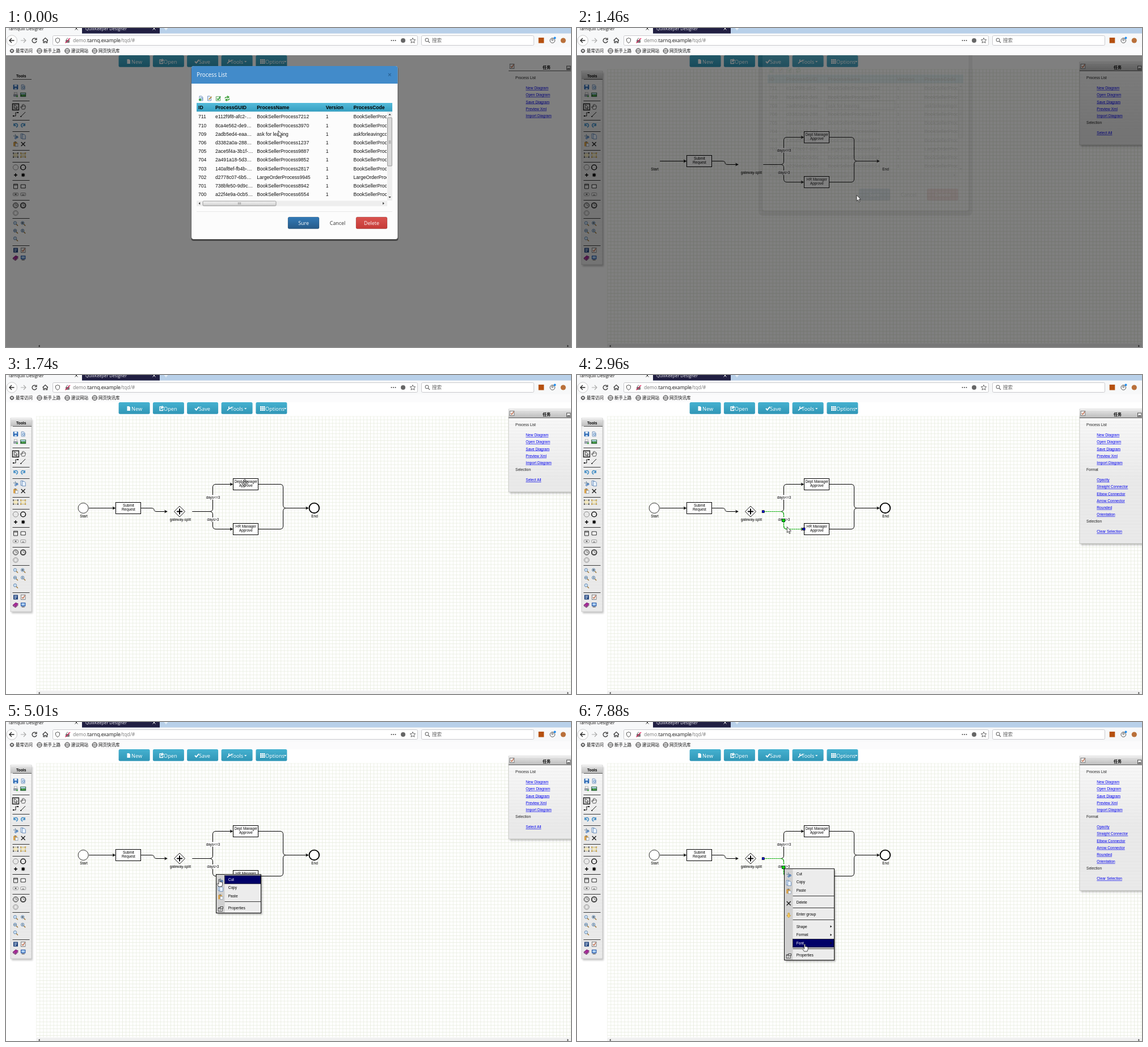
Recreate the animation shown at these times as an HTML page. Size 996 by 562 pixels, loop 8000 ms.

```html
<!DOCTYPE html>
<html lang="en">
<head>
<meta charset="utf-8">
<title>Process designer</title>
<style>
html,body{margin:0;width:100%;height:100%;overflow:hidden;background:#fff}
svg{display:block;width:996px;height:562px}
text{font-family:"Liberation Sans",Arial,sans-serif;white-space:pre}
.ui{font-family:"Open Sans","Noto Sans CJK SC","Noto Sans CJK",sans-serif}
</style>
</head>
<body>
<svg id="stage" viewBox="0 0 996 562" xmlns="http://www.w3.org/2000/svg"></svg>
<script>
const R = (x, y, w, h, fill, extra = '') => `<rect x="${x}" y="${y}" width="${w}" height="${h}" fill="${fill}" ${extra}/>`;
const P = (d, stroke = '#000', w = 1, fill = 'none', extra = '') => `<path d="${d}" stroke="${stroke}" stroke-width="${w}" fill="${fill}" ${extra}/>`;
const C = (x, y, r, stroke = '#000', w = 1, fill = 'none') => `<circle cx="${x}" cy="${y}" r="${r}" stroke="${stroke}" stroke-width="${w}" fill="${fill}"/>`;
// y is the middle of the capitals
const T = (x, y, s, size, extra = '') => `<text x="${x}" y="${y + size * .36}" font-size="${size}" ${extra}>${s.replace(/</g, '&lt;')}</text>`;
const G = (id, body, extra = '') => `<g id="${id}" ${extra}>${body}</g>`;
const at = (x, y, body) => `<g transform="translate(${x} ${y})">${body}</g>`;
const UI = 'class="ui"', MID = 'text-anchor="middle"', BOLD = 'font-weight="bold"';
const LINK = 'fill="#00e" text-decoration="underline"';

// ---- small icons, centred on 0,0
const doc = P('M-3 -4H1L3 -2V4H-3Z', '#5a7fae', .8, '#e6f0fc');
const lens = c => P('M1 1L4 4', '#a07a3c', 1.5) + C(-1, -1, 2.7, '#5c7fa8', .9, '#cfe4f5') + (c ? P(c, '#222', .8) : '');
const clock = w => C(0, 0, 4.5, '#222', w, '#fff') + C(0, 0, 2.9, '#555', .6) + P('M0 -2V0H2', '#222', .7);
const nodes = c => P('M-4 -3.5H4V3.5H-4Z', '#777', .8, '#f1e7c0', 'stroke-dasharray="1.6 1"') + R(-5, -4.5, 2, 2, c) + R(3, -4.5, 2, 2, c) + R(-5, 2.5, 2, 2, c) + R(3, 2.5, 2, 2, c);
const icon = {
  save: R(-4.3, -4.3, 8.6, 8.6, '#2563b0', 'rx="1"') + R(-2.4, -4, 4.8, 3.4, '#dcebfb') + R(-2, 1.4, 4, 2.9, '#b9d3ef'),
  preview: doc + C(.6, .5, 1.8, '#3b6ea5', .8, '#d7ebfa'),
  print: R(-4, -1, 8, 4.4, '#9aa2ad', 'rx="1"') + R(-2.4, -4, 4.8, 3.4, '#f4f4f4', 'stroke="#888" stroke-width=".5"') + R(1, 1.6, 3, 2.4, '#4aa84a'),
  image: R(-5, -3.7, 10, 7.4, '#2c5f39') + R(-4, -2.8, 8, 2.3, '#b8e0ef') + P('M-4 2.5L-1 -.5L1 1L3 0L4 2.5Z', 'none', 0, '#4fae4c'),
  pointer: P('M-5.5 -5.5H5.5V5.5H-5.5Z', '#222', 1.4, '#ddd') + P('M-2 -4V3L0 1.5L1.2 4L2.3 3.4L1.2 1H3Z', '#000', .7, '#fff'),
  pan: P('M-2 4L-4.5 0L-3 -.3L-2 1V-3L-1 -3.6V-4L1 -4.2L2.3 -3.4L4 -2V1L2.7 4Z', '#222', .8, '#fff') + P('M-.7 -3V0M1 -3V0M2.6 -2V0', '#222', .5),
  elbow: P('M-4 3H0V-3H4', '#000', .9) + R(-5, 2, 2, 2, '#000') + R(3, -4, 2, 2, '#000'),
  line: P('M-4 4L4 -4', '#000', .9) + R(-4.8, 3, 1.8, 1.8, '#000'),
  undo: P('M-3 -3V1H1M-3 .7C-1 -4 4 -3 3.4 1Q3 3 1 4', '#3d8bc4', 1.5),
  redo: P('M3 -3V1H-1M3 .7C1 -4 -4 -3 -3.4 1Q-3 3 -1 4', '#3d8bc4', 1.5),
  cut: P('M-4 -1L4 0M-1 -4L2 2', '#5f7f9c', 1) + C(0, 2.8, 1.4, '#2767b8', 1) + C(3, 1.4, 1.2, '#2767b8', 1),
  copy: at(-1.2, -.6, doc) + at(1.3, .6, doc),
  paste: R(-4, -3.8, 6.6, 7.8, '#dca349', 'rx=".8"') + R(-2.2, -4.6, 3, 1.8, '#777') + R(-.6, -1, 4.6, 5.2, '#f5f8ff', 'stroke="#789" stroke-width=".6"'),
  del: P('M-3.5 -3.5L3.5 3.5M3.5 -3.5L-3.5 3.5', '#222', 1.4),
  group: nodes('#444'), ungroup: nodes('#c8951d'),
  thin: C(0, 0, 4.6, '#777', .8), thick: C(0, 0, 4.4, '#000', 1.4),
  plus: P('M-3 0H3M0 -3V3', '#000', 1.5),
  star: C(0, 0, 2.2, '#000', 1, '#000') + P('M-3 -3L3 3M3 -3L-3 3M-3.4 0H3.4M0 -3.4V3.4', '#000', .7),
  pool: P('M-3.5 -4H3.5V4H-3.5ZM-3.5 -2.3H3.5', '#333', 1), box: P('M-4 -3H4V3H-4Z', '#111', .9, '#fff'),
  tag: R(-4.5, -2.5, 9, 5, '#eee', 'rx="1" stroke="#888" stroke-width=".8"') + R(-1.5, -1, 3, 2, '#555'),
  tag2: R(-4.5, -2.5, 9, 5, '#eee', 'rx="1" stroke="#888" stroke-width=".8"') + P('M-2 1H2', '#555', 1),
  clock: clock(1), clock2: clock(1.5), ring: C(0, 0, 4.5, '#888', .8) + C(0, 0, 3, '#999', .6),
  zoom: lens(), zoomIn: lens('M-2.6 -1H.6M-1 -2.6V.6'), zoomOut: lens('M-2.6 -1H.6'), zoomOne: lens('M-1 -2.5V.5'), zoomFit: lens(),
  chart: R(-4, -4, 8, 8, '#1d3f78') + P('M-2.5 -2H2.5M-2.5 0H2M-2.5 2H1', '#cfe0f5', 1),
  task: R(-3.8, -4, 7.6, 8, '#f3f3f3', 'stroke="#666" stroke-width=".8"') + P('M-2 0L-.4 2L3 -3', '#b5522c', 1.2),
  book: P('M-4.5 0L0 -4L4.5 -2L0 3.5Z', '#5d0d57', .6, '#a62a98') + P('M-4.5 0V2L0 4.6L4.5 0', '#5d0d57', 1),
  screen: R(-4.2, -4, 8.4, 6.4, '#2859a8') + R(-3, -3, 6, 4, '#a9cdf2') + R(-2.5, 3, 5, 1.2, '#555'),
  down: P('M-1.3 -4H1.3V0H3.5L0 4L-3.5 0H-1.3Z', '#c08a1e', .7, '#fbd063'),
  prop: R(-4, -2.2, 7, 6, '#fff', 'stroke="#222" stroke-width=".8"') + P('M-4 -1.4H3', '#222', 1) + R(-.4, -4, 4.6, 3.4, '#ddd', 'stroke="#222" stroke-width=".8"') + P('M-2.5 1H1.5M-2.5 2.4H1', '#444', .6),
};

// ---- page
const button = (x, label, tx, pic, caret) => R(x, 48, 55, 20.8, 'url(#btn)', 'rx="2.5"') +
  pic + T(tx, 59.2, label, 9.2, `${UI} fill="#fff"`) + (caret ? P(`M${caret} 58.2h4.4l-2.2 2.4Z`, 'none', 0, '#fff') : '');
const buttons = button(198.6, 'New', 221, P('M213.5 55H217L219 57V63H213.5Z', 'none', 0, '#fff')) +
  button(258.9, 'Open', 278, P('M275 56H271V62.5H276.5V60M273.3 60Q273.5 56.8 276 56.8M275 54.6L277.6 56.8L275 59', '#fff', 1.3)) +
  button(319.1, 'Save', 340, P('M333 59L335.5 61.5L340 56', '#fff', 1.9)) +
  button(379.6, 'Tools', 396, P('M390 62.5L394 58.5M393.4 55.5Q392 58.5 394 58.8Q396 59.5 397 57', '#fff', 1.7), 420) +
  button(440.4, 'Options', 457, R(448, 55, 8.4, 8, '#fff') + P('M448 57.6h8.4M448 60.4h8.4M450.7 55v8M453.6 55v8', '#37a0c0', .6), 490);

const toolRows = [[104, 'save', 'preview'], [117.5, 'print', 'image'], [139, 'pointer', 'pan'], [152, 'elbow', 'line'], [171, 'undo', 'redo'],
  [191, 'cut', 'copy'], [204.5, 'paste', 'del'], [224, 'group', 'ungroup'], [245.5, 'thin', 'thick'], [259, 'plus', 'star'],
  [279, 'pool', 'box'], [293, 'tag', 'tag2'], [312.5, 'clock', 'clock2'], [326, 'ring'], [344.5, 'zoom', 'zoomIn'],
  [358, 'zoomOut', 'zoomOne'], [371.5, 'zoomFit'], [391.5, 'chart', 'task'], [405, 'book', 'screen']];
const frame = (id, x, y, w, h) => R(x + 2, y + 3, w, h, '#000', `opacity=".22" filter="url(#soft)" class="${id}"`) +
  R(x, y, w, h, 'url(#face)', `class="${id}"`) + R(x, y, w, h, 'url(#stripe)', `class="${id}" stroke="#bbb" stroke-width=".6"`);
const tools = G('toolFace', frame('tf', 8, 76, 37, 341) + R(8, 78, 37, 12.5, 'url(#bar)')) + P('M12 90.5H45', '#333', .8) +
  T(26.7, 85, 'Tools', 6.8, `${MID} ${BOLD}`) +
  [128, 162, 182, 215, 236, 268, 303, 335, 383].map(y => P(`M11.5 ${y + .5}H41.5`, '#222', .9)).join('') +
  toolRows.map(([y, a, b]) => at(17, y, icon[a]) + (b ? at(30.2, y, icon[b]) : '')).join('');

const links = (y, names) => names.map((s, i) => T(916.3, y + i * 12.1, s, 6.6, LINK)).join('');
const head = (y, s) => T(898, y, s, 6.6, 'fill="#222"');
const panel = G('panelFace', frame('pf', 886, 60, 116, 146) + R(886, 62, 110, 13, 'url(#bar)')) + P('M886 75.5H996', '#333', .8) +
  at(892, 67.5, icon.task) + T(953, 69.3, '任务', 7, `${UI} ${MID} ${BOLD}`) +
  R(988.5, 67, 6.5, 6.5, '#eee', 'stroke="#333" stroke-width=".8"') + P('M989.5 71.7H994', '#222', 1.2) +
  head(87.5, 'Process List') + links(106, ['New Diagram', 'Open Diagram', 'Save Diagram', 'Preview Xml', 'Import Diagram']) +
  G('plain', head(166.7, 'Selection') + links(185, ['Select All'])) +
  G('format', head(166.7, 'Format') + links(185, ['Opacity', 'Straight Connector', 'Elbow Connector', 'Arrow Connector', 'Rounded', 'Orientation']) +
    head(257.7, 'Selection') + links(276, ['Clear Selection']));

// ---- diagram, lines centred on pixels
const wire = (d, tip) => P(d) + (tip ? P(`M${tip[0]} ${tip[1]}l-5 -2.6l1.2 2.6l-1.2 2.6Z`, '#000', .3, '#000') : '');
const label = (x, y, s) => T(x, y, s, 6.4, MID);
const task = (x, y, a, b) => R(x, y, 44, 20, '#fff', 'stroke="#000"') + label(x + 22.4, y + 5.3, a) + label(x + 22.4, y + 12.6, b);
const lower = 'M328.5 240.5H359Q364.5 240.5 364.5 246V266Q364.5 271.5 370 271.5H399';
const diagram = wire('M146 234.5H192', [193, 234.5]) + wire('M237.5 234.5H256Q261 234.5 261 237.5Q261 240.5 266 240.5H283', [284.5, 240.5]) +
  wire('M328.5 240.5H359Q364.5 240.5 364.5 235V198Q364.5 192.5 370 192.5H399', [400, 192.5]) + wire(lower, [400, 271.5]) +
  wire('M444 192.5H483Q488.5 192.5 488.5 198V229Q488.5 234.5 494 234.5H532', [533.5, 234.5]) +
  wire('M444 271.5H483Q488.5 271.5 488.5 266V240Q488.5 234.5 494 234.5') +
  G('picked', P(lower, '#0a0', 1.2) + P(lower, '#9fe09f', 1.2, 'none', 'stroke-dasharray="1 2.6"')) +
  task(193.5, 224.5, 'Submit', 'Request') + task(400.5, 182.5, 'Dept Manager', 'Approve') + task(400.5, 261.5, 'HR Manager', 'Approve') +
  R(353, 211.5, 24.5, 8, '#fff') + label(365, 215.4, 'days<=3') + R(354.5, 251, 21, 8, '#fff') + label(365, 254.9, 'days>3') +
  label(137, 248.3, 'Start') + label(307.3, 254.5, 'gateway-split') + label(544, 248.3, 'End') +
  G('shapes', C(136.2, 234.5, 9, '#000', .8, '#fff') + C(543.3, 234.4, 8.8, '#000', 1.9, '#fff') +
    P('M306 231L315.5 240.5L306 250L296.5 240.5Z', '#000', .9, '#fff') + P('M301 240.5H311M306 235.5V245.5', '#000', 2)) +
  G('grips', [[328.2, 240.7], [400, 271.3]].map(([x, y]) => R(x - 2, y - 2, 4, 4, '#00d', 'stroke="#000" stroke-width=".7"')).join('') +
    R(361.5, 253.5, 5, 5, '#0e0', 'stroke="#042" stroke-width="1"'));

// ---- context menus
const ROW = 14.6, GAP = 21.2;
function menu(id, x, y, w, items) {
  let cy = y + 9, body = '', rows = [];
  items.forEach(([name, pic, sub, gap], i) => {
    body += G(`${id}-${i}`, R(x + 15, cy - 7.1, w - 15.5, ROW, '#000068', 'stroke="#000" stroke-width=".6"')) +
      T(x + 21.2, cy, name, 6.6, `id="${id}t${i}"`) + (pic ? at(x + 7.7, cy + 1.6, icon[pic]) : '') +
      (sub ? P(`M${x + 81} ${cy - 2}l2.8 2l-2.8 2Z`, 'none', 0, '#111') : '');
    if (gap) body += P(`M${x + 15} ${Math.floor(cy + 10.6) - .5}H${x + w}`, '#222', .9);
    rows.push(cy);
    cy += gap ? GAP : ROW;
  });
  const h = Math.round(rows[rows.length - 1] + 8.4 - y);
  const base = R(x + 2, y + 2.5, w, h, '#000', 'opacity=".35" filter="url(#soft)"') + R(x, y, w, h, '#ececec') + R(x, y, 15, h, '#d0d0d0');
  return { id, x, y, w, h, rows, svg: G(id, base + body + R(x, y, w, h, 'none', 'stroke="#111"')) };
}
const clip = [['Cut', 'cut'], ['Copy', 'copy'], ['Paste', 'paste', 0, 1]];
const small = menu('small', 370.5, 268.5, 79, [...clip, ['Properties', 'prop']]);
const large = menu('large', 365.5, 258.5, 88, [...clip, ['Delete', 'del', 0, 1], ['Enter group', 'down', 0, 1],
  ['Shape', '', 1], ['Format', '', 1], ['Font', '', 1, 1], ['Properties', 'prop']]);

// ---- dialog
const list = [['711', 'e112f9f8-afc2-…', 'BookSellerProcess7212'], ['710', '8ca4e562-de9…', 'BookSellerProcess3970'],
  ['709', '2adb5ed4-eaa…', 'ask for leaving', 'askforleavingcode'], ['706', 'd3382a0a-288…', 'BookSellerProcess1237'],
  ['705', '2ace5f4a-3b1f-…', 'BookSellerProcess9887'], ['704', '2a491a18-5d3…', 'BookSellerProcess9852'],
  ['703', '140af8ef-fb4b-…', 'BookSellerProcess2817'], ['702', 'd2778c07-6b5…', 'LargeOrderProcess9945'],
  ['701', '738bfe50-9d9c…', 'BookSellerProcess8942'], ['700', 'a22f4e9a-0cb5…', 'BookSellerProcess6554']];
const cols = [339, 369, 442.3, 563.7, 612.5];
const cells = (y, vals, extra) => vals.map((s, i) => T(cols[i], y, s, 8.62, extra)).join('');
const tri = d => P(d, 'none', 0, '#333');
const big = (x, fill, s) => R(x, 333, 55, 20.7, fill, 'rx="2.5" stroke="#0003" stroke-width=".8"') + T(x + 27.5, 343.8, s, 8.9, `${UI} ${MID} fill="#fff"`);
const dialog = G('halo', R(320, 60, 377, 321, '#000', 'rx="8"')) + G('dialog',
  R(326.5, 68, 365, 307, '#000', 'rx="4" opacity=".45"') + R(327, 67, 363.5, 305, '#fcfcfc', 'rx="4"') +
  P('M327 98V71Q327 67 331 67H686.5Q690.5 67 690.5 71V98Z', 'none', 0, '#428bca') +
  T(336, 82.8, 'Process List', 9.9, `${UI} fill="#fff"`) + P('M674 80L678.6 84.6M678.6 80L674 84.6', '#2a6496', 1.1) +
  at(344, 124, icon.preview + C(-2, 2.5, 2.3, '#fff', .4, '#2f9e3a')) + at(358.5, 124, doc + P('M-1 2L4 -3', '#b98425', 1.6)) +
  at(374, 124.5, P('M-3.7 -3.7H3.7V3.7H-3.7Z', '#5b9a5d', .9, '#e8f6e8') + P('M-2 0L0 2L4 -4', '#23962f', 1.4)) +
  at(390, 124, P('M-4 0Q-3 -3 2 -2.4M0 -4.4L3 -2.3L.3 -.4M4 .5Q3 3.4 -2 2.8M0 .8L-3 2.7L-.3 4.7', '#3b9e37', 1.4)) +
  R(336, 132, 345, 15.3, 'url(#head)') + cells(140.2, ['ID', 'ProcessGUID', 'ProcessName', 'Version', 'ProcessCode'], BOLD) +
  G('rows', list.map(([id, g, n, code = n], i) => cells(156.3 + i * 15.2, [id, g, n, '1', code], 'fill="#111"')).join(''), 'clip-path="url(#table)"') +
  G('edit', R(439.5, 178.5, 121, 15, 'none', 'stroke="#555" stroke-width=".9"')) +
  R(672, 148, 9, 156, '#eee') + R(672.5, 158, 7.8, 85, '#d9d9d9', 'rx="1" stroke="#888" stroke-width=".8"') +
  P('M674.5 199h4M674.5 201h4M674.5 203h4', '#777', .7) + tri('M674.3 153.5l2.2 -2.6l2.2 2.6Z') + tri('M674.3 297l2.2 2.6l2.2 -2.6Z') +
  R(336, 304.3, 336, 9.5, '#eee') + R(347, 305, 129, 8.2, 'url(#thumb)', 'rx="1.5" stroke="#888" stroke-width=".8"') +
  P('M409.5 307v4M411.5 307v4M413.5 307v4', '#777', .7) + tri('M342.2 306.8l-2.6 2.2l2.6 2.2Z') + tri('M664.2 306.8l2.6 2.2l-2.6 2.2Z') +
  P('M336 323.5H681', '#e5e5e5', .8) + big(497, 'url(#blue)', 'Sure') + T(584.5, 343.8, 'Cancel', 8.9, `${UI} ${MID} fill="#333"`) + big(617, 'url(#red)', 'Delete'));

// ---- browser window
const globe = x => C(x, 40.3, 4.3, '#333', .9) + P(`M${x - 4} 40.3h8M${x} 36v8.6M${x - 2} 37q-2 3.3 0 6.6M${x + 2} 37q2 3.3 0 6.6`, '#333', .6);
const mark = (x, s) => T(x, 40.2, s, 7.5, `${UI} fill="#111"`);
const grey = s => `<tspan fill="#777">${s}</tspan>`;
const cross = (x, c) => P(`M${x - 2.5} -1.5l5 5M${x + 2.5} -1.5l-5 5`, c, 1);
const chrome = R(0, 0, 996, 48, '#f7f8f9') + R(0, 34, 996, 14, '#fbfbfc') + R(134, 0, 862, 9.6, '#b8d0e9') + R(134, 0, 137, 9.6, '#211f42') +
  T(4, .9, 'Tarnquill Designer', 7.4, `${UI} fill="#111"`) + T(140, .9, 'QuillKeeper Designer', 7.4, `${UI} fill="#f0f0f5"`) +
  cross(124, '#333') + cross(261, '#eee') + P('M279 1H285M282 -2V4', '#fff', 1) +
  C(10.3, 22, 9.2, '#bbb', .8, '#fdfdfd') + P('M14.5 22H6.3M10 18L6 22L10 26', '#222', 1.3) + P('M26 22H34.3M31 18L35 22L31 26', '#aaa', 1.2) +
  P('M53 19.3A4 4 0 1 0 54 23M54 17.5V20.7H50.7', '#333', 1.3) + P('M64.6 22L69.3 17.6L74 22M66 21.5V26H68V23.5H70.6V26H72.6V21.5', '#333', 1.2) +
  R(82.5, 13.5, 643, 17, '#fff', 'rx="2" stroke="#c4c4c8" stroke-width=".9"') + R(732.5, 13.5, 198, 17, '#fff', 'rx="2" stroke="#c4c4c8" stroke-width=".9"') +
  P('M91 17.6L94.5 19V22Q94.5 25 91 26.6Q87.5 25 87.5 22V19Z', '#555', 1) + R(105, 21, 7, 5, '#777', 'rx=".8"') + P('M106.5 21V19.5Q108.5 16.5 110.5 19.5V21', '#777', 1) + P('M104.5 26.5L113 18', '#e0245e', 1.2) +
  `<text class="ui" x="118" y="25.1" font-size="8.6" fill="#111">${grey('demo.')}tarnq.example${grey('/tqd/#')}</text>` +
  [679.5, 683, 686.5].map(x => C(x, 22, 1, 'none', 0, '#444')).join('') + C(700, 22, 4, 'none', 0, '#666') +
  P('M717 17.5L718.4 20.5L721.7 20.8L719.2 23L720 26.3L717 24.6L714 26.3L714.8 23L712.3 20.8L715.6 20.5Z', '#555', .9) +
  C(742, 21, 3, '#555', 1) + P('M744.3 23.3L747 26', '#555', 1.1) + T(751, 22, '搜索', 8.6, `${UI} fill="#666"`) +
  R(938.7, 17, 9.6, 9.6, '#b5500f') + C(963.3, 22, 4.3, '#444', .9) + C(963.3, 20.7, 1.5, '#444', .9) + C(967.5, 17.5, 2, 'none', 0, '#1f8ef0') + C(982.3, 22, 4.6, 'none', 0, '#b9703a') +
  C(10.5, 40.3, 2.6, '#333', 1.1) + P('M10.5 36v8.6M6.2 40.3h8.6M7.5 37.3l6 6M13.5 37.3l-6 6', '#333', .7) + C(10.5, 40.3, 1.5, 'none', 0, '#fbfbfc') +
  mark(17, '最常访问') + globe(59) + mark(66, '新手上路') + globe(108) + mark(115, '建议网站') + globe(156.3) + mark(163, '网页快讯库');

const cursors = G('arrow', P('M0 0V10.3L2.4 8.1L4.1 12L5.7 11.3L4 7.5H7.2Z', '#000', .7, '#fff')) +
  G('hand', P('M-1 1Q0 -.6 1 1V5L2.4 4.6L4 5L5.6 5.5V9.5L4.4 13H-1.2L-4 8.4Q-3.6 7 -2.4 7.8L-1 9Z', '#000', .7, '#fff')) +
  G('move', P('M0 -6.5L2.3 -3.8H.8V-.8H3.8V-2.3L6.5 0L3.8 2.3V.8H.8V3.8H2.3L0 6.5L-2.3 3.8H-.8V.8H-3.8V2.3L-6.5 0L-3.8 -2.3V-.8H-.8V-3.8H-2.3Z', '#000', .7, '#fff'));

const fade = (id, a, b) => `<linearGradient id="${id}" x2="0" y2="1"><stop stop-color="${a}"/><stop offset="1" stop-color="${b}"/></linearGradient>`;
const tile = (id, x, y, w, h, body) => `<pattern id="${id}" x="${x}" y="${y}" width="${w}" height="${h}" patternUnits="userSpaceOnUse">${body}</pattern>`;
const defs = '<defs>' + fade('btn', '#45b1d0', '#3096b6') + fade('head', '#55bbda', '#369fc1') + fade('blue', '#337ab7', '#265a88') +
  fade('red', '#d9534f', '#c63a36') + fade('thumb', '#f4f4f4', '#cfcfcf') + fade('bar', '#e2e2e2', '#bdbdbd') +
  '<linearGradient id="face" gradientUnits="userSpaceOnUse" x1="0" y1="75" x2="0" y2="185"><stop stop-color="#fff"/><stop offset="1" stop-color="#ededed"/></linearGradient>' +
  tile('stripe', 0, 75, 10, 2.43, R(0, 0, 10, .9, '#d9d9d9', 'opacity=".6"')) +
  tile('grid', 53.3, 72.5, 6.07, 6.07, P('M0 .4H6.07M.4 0V6.07', '#e6ebdd', .8)) +
  '<clipPath id="table"><rect x="336" y="148" width="335" height="156"/></clipPath>' +
  '<filter id="soft" x="-20%" y="-20%" width="140%" height="140%"><feGaussianBlur stdDeviation="1.5"/></filter></defs>';

document.getElementById('stage').innerHTML = defs + R(0, 0, 996, 562, '#fff') +
  G('grid0', R(53.3, 72.5, 943, 483, 'url(#grid)') + R(53.3, 556, 943, 6, '#f0f0f0')) + tri('M59.5 558.3l-2.3 2l2.3 2Z') + tri('M989.5 558.3l2.3 2l-2.3 2Z') +
  G('diagram', diagram) + buttons + tools + panel + small.svg + large.svg +
  G('dim', R(0, 48, 996, 514, '#000')) + dialog + chrome + G('cursor', cursors);

// ---- motion
const el = id => document.getElementById(id);
const show = (id, on) => el(id).setAttribute('display', on ? 'inline' : 'none');
const LOOP = 8000;
// screen updates come in bursts: start, end, steps
const bursts = [[0, 0, 1], [150, 150, 1], [420, 1460, 9], [1590, 1860, 3], [2140, 2690, 5], [2960, 3880, 8],
  [4870, 5390, 5], [5670, 6510, 7], [6780, 6780, 1], [7460, 7880, 4]];
const path = [[0, 480, 181, 'arrow'], [150, 479.7, 186, 'arrow'], [680, 480, 187, 'arrow'], [1070, 507, 341, 'hand'], [1200, 508, 343, 'hand'],
  [1330, 503, 325, 'arrow'], [1460, 493, 294.5, 'arrow'], [1590, 466, 243.5, 'arrow'], [1725, 421, 190, 'move'], [1860, 411, 186, 'move'],
  [2140, 400, 205, 'arrow'], [2690, 370.3, 267.5, 'arrow'], [4870, 370.3, 267.5, 'arrow'], [5000, 376, 277, 'hand'], [5390, 384, 329, 'hand'],
  [5670, 379, 321, 'hand'], [5810, 360, 298, 'arrow'], [5950, 346, 279, 'arrow'], [6090, 350.3, 271, 'arrow'], [6510, 364, 256.5, 'arrow'],
  [7460, 364, 256.5, 'arrow'], [7600, 376, 300, 'hand'], [7880, 401.5, 391, 'hand']];

function snap(t) {
  const [a, b, n] = bursts.filter(s => s[0] <= t).pop();
  if (n < 2) return a;
  const step = (b - a) / (n - 1);
  return Math.min(b, a + Math.floor((t - a) / step + 1e-6) * step);
}
function pointer(t) {
  let i = path.length - 1;
  while (path[i][0] > t + .01) i--;
  const a = path[i], b = path[i + 1] || a, k = b === a ? 0 : Math.max(0, (t - a[0]) / (b[0] - a[0]));
  return [a[1] + (b[1] - a[1]) * k, a[2] + (b[2] - a[2]) * k, a[3]];
}
function drawMenu(m, on, x, y) {
  show(m.id, on);
  m.rows.forEach((cy, i) => {
    const hot = on && x > m.x && x < m.x + m.w && Math.abs(y - cy) < ROW / 2;
    show(`${m.id}-${i}`, hot);
    el(`${m.id}t${i}`).setAttribute('fill', hot ? '#fff' : '#000');
  });
}
function draw(ms) {
  const t = snap(ms), [x, y, kind] = pointer(t);
  const loaded = t >= 1329, picked = (t >= 2960 && t < 4870) || t >= 6780;
  for (const id of ['grid0', 'diagram', 'toolFace', 'panelFace']) show(id, loaded);
  show('shapes', t >= 1590);
  show('picked', picked);
  show('grips', picked);
  show('plain', loaded && !picked);
  show('format', picked);
  document.querySelectorAll('.pf').forEach(r => r.setAttribute('height', picked ? 237 : 146));

  const k = Math.min(1, Math.max(0, (t - 1200) / 260)), open = t < 1590, lift = `translate(0 ${-50 * k})`;
  show('dialog', open);
  show('halo', open && k > 0);
  show('edit', t >= 550);
  el('dialog').setAttribute('opacity', 1 - .95 * k);
  el('halo').setAttribute('opacity', .06);
  el('dialog').setAttribute('transform', lift);
  el('halo').setAttribute('transform', lift);
  el('dim').setAttribute('opacity', open ? .5 : t < 1720 ? .15 : 0);

  drawMenu(small, t >= 4870 && t < 6780, x, y);
  drawMenu(large, t >= 7460, x, y);
  for (const id of ['arrow', 'hand', 'move']) show(id, id === kind);
  el('cursor').setAttribute('transform', `translate(${x} ${y})`);
}
const start = performance.now();
function tick() {
  draw((performance.now() - start) % LOOP);
  requestAnimationFrame(tick);
}
tick();
</script>
</body>
</html>
```
